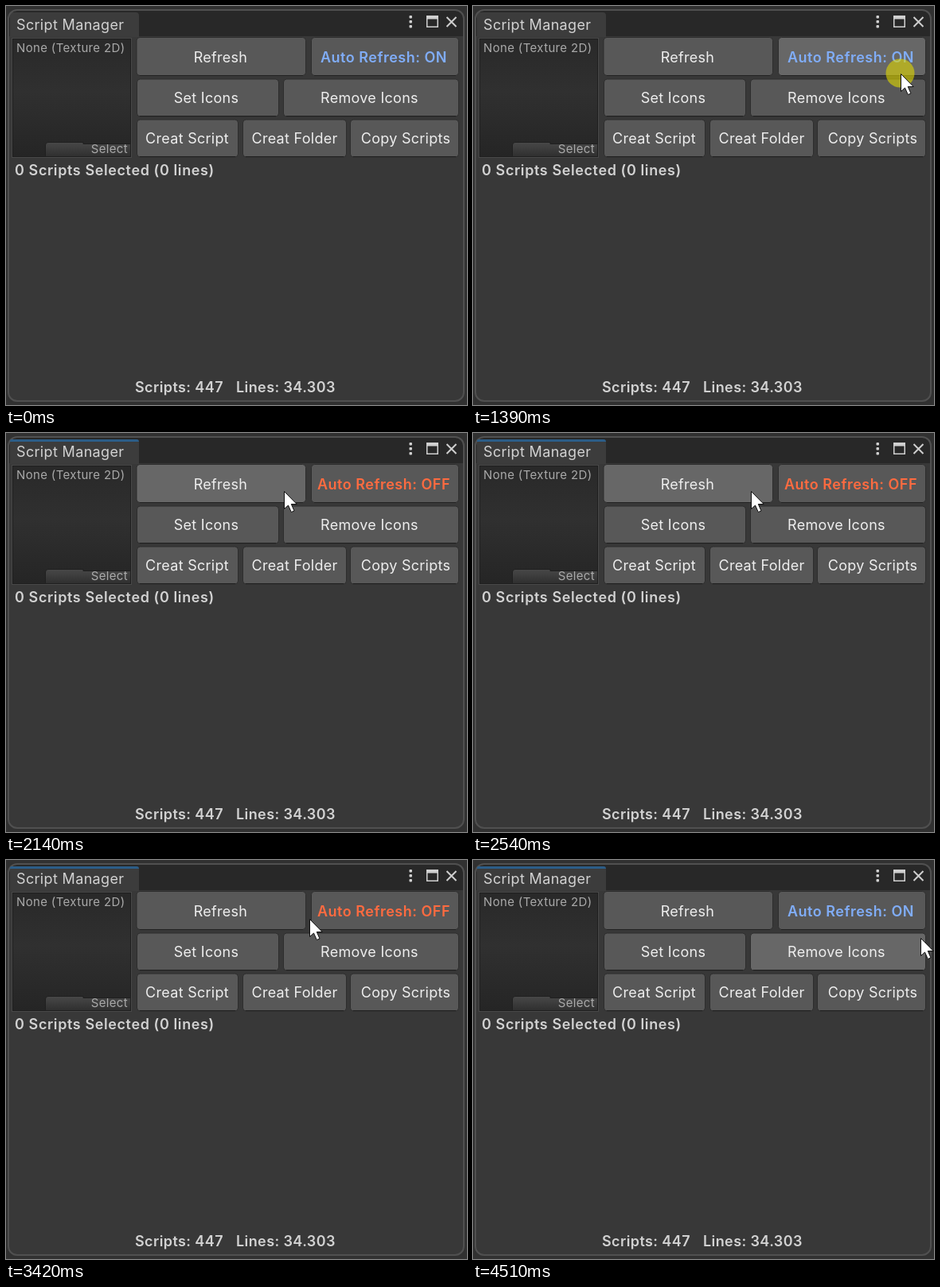
An HTML page that plays this animation: 579x502 px, repeating every 4580 ms.

```html
<!DOCTYPE html>
<html lang="en">
<head>
<meta charset="utf-8">
<title>Script Manager</title>
<style>
html, body { margin: 0; width: 100%; height: 100%; overflow: hidden; background: #313131; }
svg { display: block; width: 579px; height: 502px; }
text {
  font: 18px Inter, "Open Sans", sans-serif;
  font-variation-settings: "opsz" 14;
  letter-spacing: .28px;
  fill: #eee;
}
.mid { text-anchor: middle; }
.bold { font-weight: 600; letter-spacing: .4px; fill: #d2d2d2; }
.mid .bold { letter-spacing: .5px; }
.bold.wide { letter-spacing: .6px; }
.small { font-size: 15px; letter-spacing: .35px; fill: #a9a9a9; }
.title { letter-spacing: .35px; fill: #d2d2d2; }
.btn rect { height: 47px; rx: 4px; fill: #585858; stroke: #2d2d2d; }
.btn .top { height: 48px; }
.btn path { stroke: #222; fill: none; }
.icon { fill: #d0d0d0; }

/* one loop; every change is a hard step */
.anim { animation: 4.58s step-end infinite; }
#refresh { animation-name: refresh; }
#auto { animation-name: auto; }
#remove { animation-name: remove; }
#focus { animation-name: focus; }
#on { animation-name: on; fill: #80adf8; }
#off { animation-name: off; fill: #ff6b40; }
#cursor { animation-name: move; }
#click { animation-name: click; }

@keyframes refresh {
  0%, 70.3% { fill: #585858; }
  45.19%, 55.45%, 64.41% { fill: #676767; }
  52.62%, 62.88% { fill: #46607c; }
}
@keyframes auto {
  0%, 45.19%, 92.79% { fill: #585858; }
  18.77%, 77.72%, 85.37% { fill: #676767; }
  83.84% { fill: #46607c; }
}
@keyframes remove {
  0%, 17.24% { fill: #585858; }
  15.72%, 95.63%, 100% { fill: #676767; }
}
@keyframes focus {
  0% { opacity: 0; }
  31.87%, 100% { opacity: 1; }
}
@keyframes on {
  0%, 85.37%, 100% { opacity: 1; }
  33.4% { opacity: 0; }
}
@keyframes off {
  0%, 85.37%, 100% { opacity: 0; }
  33.4% { opacity: 1; }
}
@keyframes click {
  0%, 33.4%, 55.45%, 64.41%, 85.37%, 100% { opacity: 0; }
  30.34%, 52.62%, 62.88%, 83.84% { opacity: .6; }
}
@keyframes move {
  0% { transform: translate(600px, 110px); }
  15.72% { transform: translate(565px, 96px); }
  17.24% { transform: translate(556px, 92px); }
  18.77% { transform: translate(544px, 87px); }
  21.61% { transform: translate(537px, 85px); }
  39.08% { transform: translate(531px, 84px); }
  40.61% { transform: translate(492px, 80px); }
  42.13% { transform: translate(440px, 76px); }
  43.66% { transform: translate(388px, 73px); }
  45.19% { transform: translate(357px, 72px); }
  46.72% { transform: translate(349px, 73px); }
  68.77% { transform: translate(364px, 73px); }
  70.3% { transform: translate(379px, 73px); }
  74.67% { transform: translate(381px, 74px); }
  76.2% { transform: translate(382px, 75px); }
  77.72% { transform: translate(386px, 77px); }
  79.25% { transform: translate(390px, 79px); }
  80.78% { transform: translate(392px, 80px); }
  89.73% { transform: translate(397px, 80px); }
  91.26% { transform: translate(423px, 83px); }
  92.79% { transform: translate(460px, 88px); }
  94.1% { transform: translate(498px, 92px); }
  95.63% { transform: translate(532px, 96px); }
  96.94% { transform: translate(554px, 98px); }
  98.47%, 100% { transform: translate(562px, 98px); }
}
</style>
</head>
<body>
<svg viewBox="0 0 579 502">
  <defs>
    <linearGradient id="well" x2="0" y2="1">
      <stop stop-color="#292929"/>
      <stop offset=".45" stop-color="#303030"/>
      <stop offset="1" stop-color="#252525"/>
    </linearGradient>
    <linearGradient id="pick" x2="0" y2="1">
      <stop stop-color="#484848"/>
      <stop offset="1" stop-color="#2f2f2f"/>
    </linearGradient>
  </defs>

  <!-- window -->
  <rect x="3" y="5" width="572" height="492" rx="11" fill="#383838"/>
  <path d="M4 38V16Q4 6 14 6H564Q574 6 574 16V38Z" fill="#282828"/>
  <path d="M5 39V8H163Q167 8 167 12V39Z" fill="#3c3c3c"/>
  <rect x="3" y="5" width="572" height="492" rx="11" fill="none" stroke="#505050" stroke-width="2"/>
  <path id="focus" class="anim" d="M5 11V10Q5 8 7 8H164Q167 8 167 11Z" fill="#2c5d87"/>
  <text class="title" x="13" y="30">Script Manager</text>

  <g class="icon">
    <rect x="506.5" y="12" width="3.5" height="3.5" rx="1"/>
    <rect x="506.5" y="18" width="3.5" height="3.5" rx="1"/>
    <rect x="506.5" y="24" width="3.5" height="3.5" rx="1"/>
    <path d="M528 12H543V27H528ZM529.5 16.5V25.5H541.5V16.5Z" fill-rule="evenodd"/>
    <path d="M553.5 14L565.5 26M565.5 14L553.5 26" stroke="#d0d0d0" stroke-width="2"/>
  </g>

  <!-- texture slot -->
  <rect x="7.5" y="40.5" width="150" height="150" fill="none" stroke="#484848"/>
  <rect x="8.5" y="41.5" width="148" height="148" fill="url(#well)" stroke="#1e1e1e"/>
  <path d="M49.5 189.5V175Q49.5 171.5 53 171.5H97V173.5H156.5V189.5Z" fill="url(#pick)" stroke="#1f1f1f"/>
  <text class="small" x="13" y="58">None (Texture 2D)</text>
  <text class="small" x="153" y="185" text-anchor="end">Select</text>

  <!-- buttons -->
  <g class="btn">
    <rect id="refresh" class="top anim" x="164" y="39.5" width="212.5"/>
    <rect id="auto" class="top anim" x="383.5" y="39.5" width="185"/>
    <path d="M168 87.5H373M387 87.5H565"/>
    <rect x="164.5" y="92" width="178"/>
    <rect id="remove" class="anim" x="348.5" y="92" width="220"/>
    <path d="M168 138.5H339M352 138.5H565"/>
    <rect x="164.5" y="143" width="127"/>
    <rect x="297.5" y="143" width="130"/>
    <rect x="432.5" y="143" width="136"/>
    <path d="M168 189.5H288M301 189.5H424M436 189.5H565"/>
  </g>
  <g class="mid">
    <text x="269.5" y="71">Refresh</text>
    <text id="on" class="bold anim" x="474.5" y="71">Auto Refresh: ON</text>
    <text id="off" class="bold anim" x="474.5" y="71">Auto Refresh: OFF</text>
    <text x="251.5" y="122">Set Icons</text>
    <text x="456.5" y="122">Remove Icons</text>
    <text x="227.5" y="173">Creat Script</text>
    <text x="362.5" y="173">Creat Folder</text>
    <text x="502" y="173">Copy Scripts</text>
  </g>

  <!-- status -->
  <text class="bold wide" x="11" y="213">0 Scripts Selected (0 lines)</text>
  <text class="bold" x="162" y="486">Scripts: 447</text>
  <text class="bold" x="289" y="486">Lines: 34.303</text>

  <g id="cursor" class="anim">
    <circle id="click" class="anim" cx="-.5" cy="-.5" r="18" fill="#e0d800"/>
    <path d="M.5 .5V22.5L5.5 18L9.3 26.5L13 25L9.3 16.5H16.2Z" fill="#fff" stroke="#111"/>
  </g>
</svg>
</body>
</html>
```
